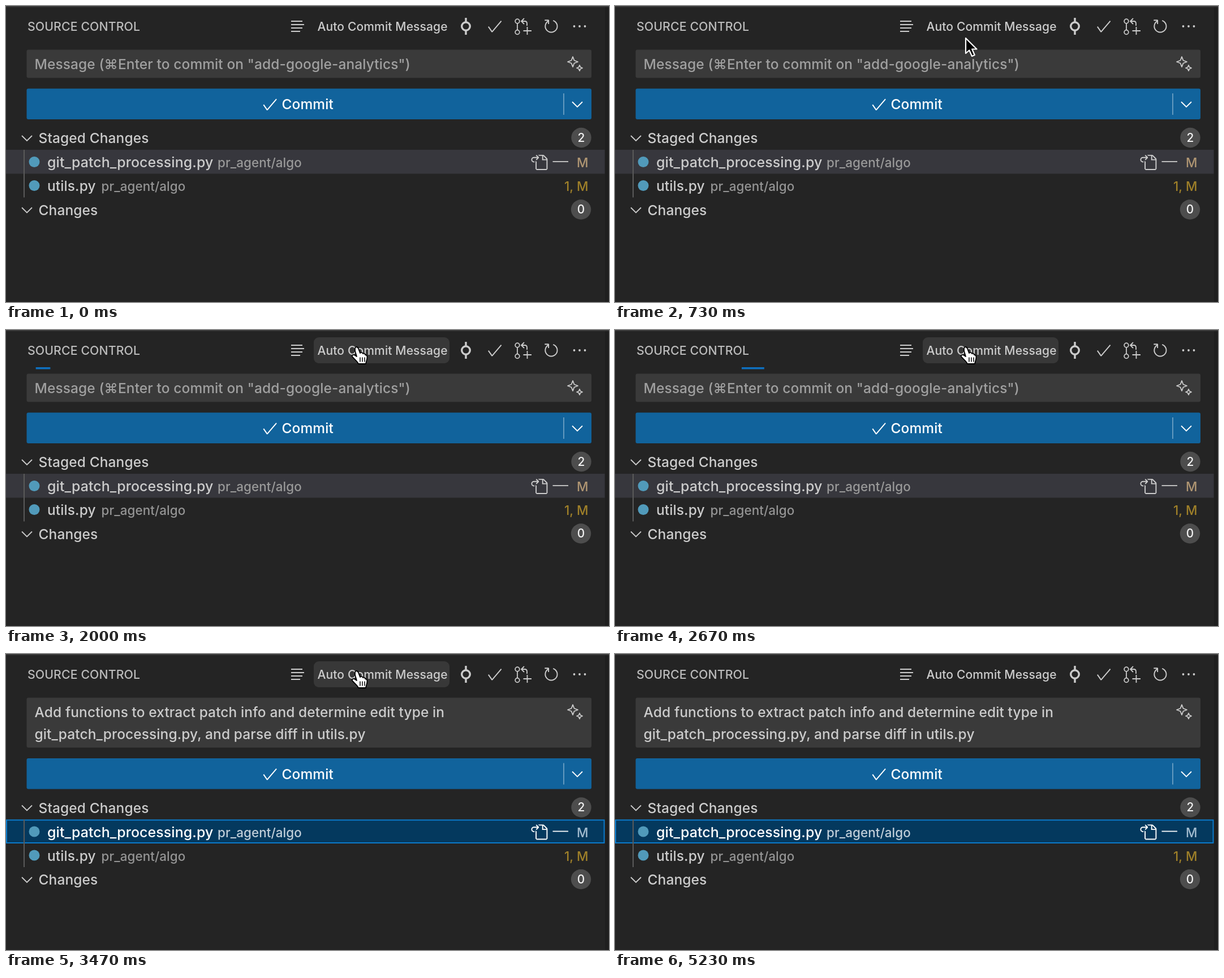
Recreate the animation shown at these times as an HTML page. Size 1066x525 px, loop 5330 ms.

```html
<!DOCTYPE html>
<html lang="en">
<head>
<meta charset="utf-8">
<title>Auto commit message</title>
<style>
  html, body { margin: 0; width: 100%; height: 100%; overflow: hidden; background: #242424; }
  svg { display: block; position: fixed; left: 0; top: 0; }
  text { font: 450 24.5px Inter, "Noto Sans", sans-serif; letter-spacing: .004em; fill: #cccccc; white-space: pre; }
  .title { font-size: 21.3px; fill: #bbbbbb; }
  .action { font-size: 21.1px; }
  .hint { fill: #a0a0a0; }
  .file { font-size: 24.9px; }
  .path { font-size: 22.4px; fill: #949494; }
  .state { font-size: 22.4px; font-weight: 500; fill: #a08129; text-anchor: end; }
  .badge { font-size: 20.8px; fill: #f4f4f4; text-anchor: middle; }
  .line { fill: none; stroke: #cccccc; stroke-width: 1.8; }
  .icon { fill: #cccccc; }
  .white { fill: #ffffff; }
  .line.white { fill: none; stroke: #ffffff; }

  .before, .after, .list, .row, .hover, .arrow, .hand { animation: 5.33s step-end infinite; }
  .before { animation-name: before; }
  .after { animation-name: after; }
  .list { animation-name: drop; }
  .row { animation-name: select; }
  .hover, .hand { animation-name: hover; }
  .arrow { animation-name: arrow; }
  .pointer { animation: move 5.33s infinite; }
  .bit { transform-box: fill-box; transform-origin: center; animation: progress 5.33s infinite; }

  .row .bg { fill: var(--bg); stroke: var(--edge); stroke-width: 2; }
  .row .file { fill: var(--name); }
  .row .path { fill: var(--path); }
  .row .state { fill: var(--state); }
  .row .line { stroke: var(--icon); }
  .row .icon { fill: var(--icon); }

  @keyframes before { 0% { visibility: visible } 65.09%, 100% { visibility: hidden } }
  @keyframes after { 0% { visibility: hidden } 65.09%, 100% { visibility: visible } }
  @keyframes drop { 0% { transform: none } 65.09%, 100% { transform: translateY(38.5px) } }
  @keyframes select {
    0% { --bg: #37373d; --edge: #37373d; --name: #cccccc; --path: #999999; --state: #b09673; --icon: #cccccc }
    65.09%, 100% { --bg: #04395e; --edge: #0b7bcb; --name: #ffffff; --path: #c0ced9; --state: #a3bccf; --icon: #ffffff }
  }
  @keyframes hover {
    0% { visibility: hidden } 15% { visibility: visible } 87.61%, 100% { visibility: hidden }
  }
  @keyframes arrow {
    0% { visibility: hidden } 1.3% { visibility: visible } 15%, 100% { visibility: hidden }
  }
  @keyframes move {
    0%, 1.3% { transform: translate(684px, 452px); animation-timing-function: cubic-bezier(.3, .3, .3, 1) }
    12.5%, 13.8% { transform: translate(620px, 57px); animation-timing-function: ease-out }
    17.5%, 100% { transform: translate(618px, 30px) }
  }
  /* the bar grows as it travels, redrawn 15 times a second */
  @keyframes progress {
    0% { transform: translateX(6.5%) scaleX(1.005); visibility: hidden; animation-timing-function: step-end }
    33.76% { transform: translateX(6.5%) scaleX(1.005); visibility: visible; animation-timing-function: steps(25, end) }
    65.08% { transform: translateX(2114%) scaleX(2.691); visibility: visible; animation-timing-function: step-end }
    65.09%, 100% { transform: translateX(2114%) scaleX(2.691); visibility: hidden }
  }
</style>
</head>
<body>
<svg width="1066" height="525" viewBox="0 0 1066 525">
  <defs>
    <!-- icons on a 16 unit grid -->
    <path id="check" transform="scale(1.93)" d="M14.43 3.32L5.96 13.32L5.17 13.29L1.82 8.52L2.64 7.94L5.62 12.18L13.67 2.68Z"/>
    <path id="refresh" transform="scale(1.93)" d="M4.68 3H2V2H5.5L6 2.5V6H5V4A5 5 0 1 0 9.53 3.24L9.83 2.29A6 6 0 1 1 4.68 3Z"/>
    <path id="open" transform="scale(1.93)" fill-rule="evenodd" d="M6 5.91L8.06 3.85V3.15L5.91 1L5.21 1.71L6.5 3H3.5A2.5 2.5 0 0 0 3.5 8H4V7H3.5A1.5 1.5 0 1 1 3.5 4H6.5L5.21 5.29L5.91 6ZM11 2H8.33L7.33 1H12L12.71 1.29L15.71 4.29L16 5V14L15 15H6L5 14V6.5L6 7.35V14H15V6H11ZM12 2V5H15Z"/>
    <path id="chevron" d="M-9 -4.500L0 4.500L9 -4.500"/>
  </defs>

  <rect width="1066" height="525" fill="#242424"/>
  <rect x="1059" width="7" height="525" fill="#1f1f1f"/>
  <rect width="1066" height="2" fill="#3a3a3a"/>

  <!-- title bar -->
  <rect class="hover" x="544" y="13" width="240" height="46" rx="9" fill="#383838"/>
  <text class="title" x="38" y="43.5">SOURCE CONTROL</text>
  <path class="line" d="M504 27H524M504 33H527M504 39H524M504 45H520"/>
  <text class="action" x="550.5" y="43.5">Auto Commit Message</text>
  <g class="line">
    <g style="stroke-width:3.4"><circle cx="813" cy="36" r="7.3"/><path d="M813 21V29M813 43V51"/></g>
    <circle cx="904" cy="27" r="3.8"/>
    <circle cx="904" cy="46.5" r="3.8"/>
    <path d="M904 31V42.5M916 22L911 27L916 32M911 27H917Q921 27 921 31V35M921.5 37V51M914.5 44H929"/>
  </g>
  <g class="icon">
    <use href="#check" x="848.5" y="20.8"/>
    <use href="#refresh" x="948.5" y="20.5"/>
    <circle cx="1004.5" cy="36" r="1.9"/><circle cx="1014" cy="36" r="1.9"/><circle cx="1023.5" cy="36" r="1.9"/>
  </g>
  <rect class="bit" y="66" width="21.16" height="3.5" fill="#0e70c0"/>

  <!-- message box -->
  <rect class="before" x="36.5" y="77.5" width="998.5" height="50" rx="3" fill="#3a3a3a"/>
  <rect class="after" x="36.5" y="77.5" width="998.5" height="88.5" rx="3" fill="#3a3a3a"/>
  <text class="hint before" x="50.5" y="112">Message (⌘Enter to commit on "add-google-analytics")</text>
  <g class="after">
    <text x="50.5" y="112">Add functions to extract patch info and determine edit type in</text>
    <text x="50.5" y="150.5">git_patch_processing.py, and parse diff in utils.py</text>
  </g>
  <g class="line" stroke-linejoin="round">
    <path d="M1002 90L1004.500 96.500L1011 99L1004.500 101.500L1002 108L999.500 101.500L993 99L999.500 96.500Z"/>
    <path d="M1014 105L1015.500 108.500L1019 110L1015.500 111.500L1014 115L1012.500 111.500L1009 110L1012.500 108.500Z"/>
  </g>

  <g class="list">
    <!-- commit button -->
    <rect x="36.5" y="146.5" width="998.5" height="54.5" rx="3" fill="#11639c"/>
    <use class="white" href="#check" x="451" y="159.3"/>
    <text class="white" x="487.5" y="183">Commit</text>
    <path d="M986 155V193" stroke="#78a7c8" stroke-width="1.6"/>
    <use class="line white" href="#chevron" x="1010" y="174.5"/>

    <!-- staged files -->
    <use class="line" href="#chevron" x="37" y="234.5"/>
    <text x="57.5" y="243">Staged Changes</text>
    <circle cx="1017" cy="233.5" r="17.7" fill="#4d4d4d"/>
    <text class="badge" x="1017" y="240.5">2</text>

    <g class="row">
      <rect class="bg" x="1" y="256" width="1056.5" height="40.5"/>
      <circle cx="50" cy="276.5" r="9.5" fill="#519aba"/>
      <text class="file" x="73" y="286">git_patch_processing.py</text>
      <text class="path" x="374" y="286">pr_agent/algo</text>
      <use class="icon" href="#open" x="926.5" y="262"/>
      <path class="line" d="M966.500 276H994"/>
      <text class="state" x="1029.5" y="286">M</text>
    </g>

    <circle cx="50" cy="318.5" r="9.5" fill="#519aba"/>
    <text x="73" y="328">utils.py</text>
    <text class="path" x="168.5" y="328">pr_agent/algo</text>
    <text class="state" x="1029.5" y="328">1, M</text>
    <path d="M32 255V339.500" stroke="#5a5a5a" stroke-width="2"/>

    <use class="line" href="#chevron" x="37" y="362"/>
    <text x="57.5" y="370.5">Changes</text>
    <circle cx="1016.5" cy="361" r="17.7" fill="#4d4d4d"/>
    <text class="badge" x="1016.5" y="368">0</text>
  </g>

  <!-- mouse pointer -->
  <g class="pointer" stroke-linejoin="round" stroke-linecap="round">
    <path class="arrow" d="M0 0V27L6.300 21.500L11 32L15.800 30L11.200 19.500H19.500Z" fill="#000" stroke="#fff" stroke-width="2.2"/>
    <g class="hand">
      <path d="M-1 2C1-1 4 0 5 3L8 11C10 9 12.500 10 13 12C15 11 17 12 17 14C19 14 20.500 15 20.500 18C20.500 22 19 25 18 30H5C3 25-3 21-6 17C-7 14-3 13-1 15L2 17L-1 7Z" fill="#fff" stroke="#000" stroke-width="1.8"/>
      <path d="M8 19V26M12 19V26M16 19V26" fill="none" stroke="#000" stroke-width="1.5"/>
    </g>
  </g>
</svg>
</body>
</html>
```
